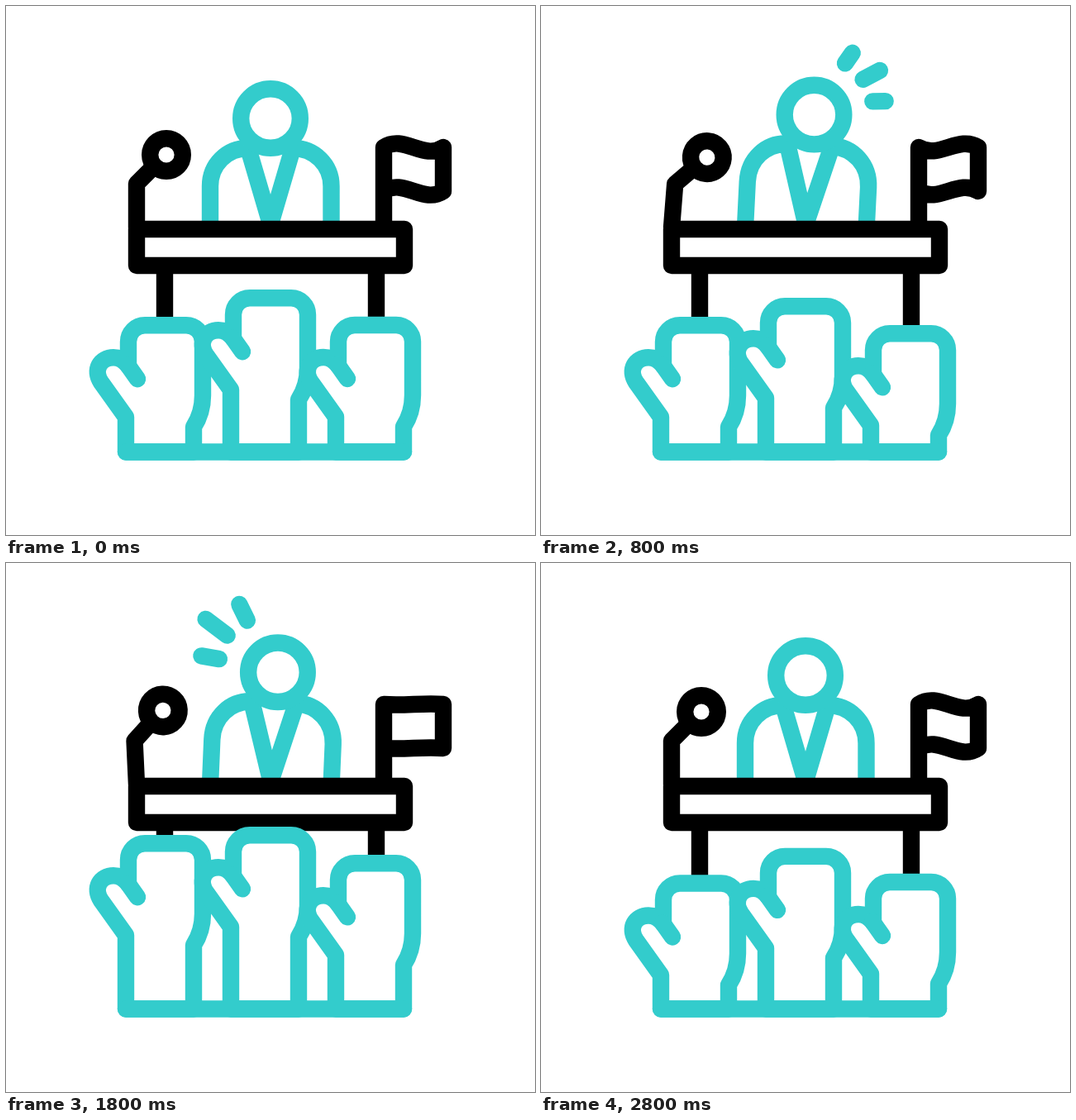
Animation of 640x640 px, one loop 2.84 s. Source, as an HTML page with a canvas:

```html
<!DOCTYPE html>
<html lang="en">
<head>
<meta charset="utf-8">
<title>Speaker and audience</title>
<style>
  html, body { margin: 0; width: 100%; height: 100%; overflow: hidden; background: #fff; }
  canvas { display: block; width: 640px; height: 640px; }
</style>
</head>
<body>
<canvas id="stage" width="640" height="640"></canvas>
<script>
const ctx = document.getElementById('stage').getContext('2d');
const TEAL = '#33cccc', BLACK = '#000';
const STEP = 40, STEPS = 71;
const RAD = Math.PI / 180;

// The speaker leans left (-1) and right (1) twice per loop
const LEAN = [[0, 0], [6, -1], [13, -1], [18, 1], [24, 1], [30, 0],
              [35, 0], [40, -1], [46, 1], [60, 1], [67, 0]];

// Each hand swings between its two levels; turns are the steps where it reverses, highest first
const HANDS = [
  { x: 0, levels: [327, 383], turns: [-7, 2, 9, 18, 27, 37, 44, 53, 62, 72] },
  { x: 127, levels: [319, 387], turns: [-15, -6, 4, 13, 27, 35, 45, 56, 65, 77] },
  { x: 254, levels: [320, 386], turns: [-6, 2, 13, 20, 30, 40, 50, 57, 64, 72] }
];
for (const hand of HANDS) hand.path = hand.turns.map((t, i) => [t, hand.levels[i % 2]]);

// Rays burst on alternating sides, twice per loop
const LEFT = { side: -1, radius: 67, turn: 26 };
const RIGHT = { side: 1, radius: 72, turn: 35 };
const BURSTS = [[7, LEFT], [19, RIGHT], [42, LEFT], [54, RIGHT]];
const BURST_STEPS = 7;

const mix = (a, b, u) => a + (b - a) * u;
const ease = u => u * u * (3 - 2 * u);

// Eased value at step k on a path of [step, value] points
function along(path, k) {
  const next = path.findIndex(([t]) => t > k);
  if (next === 0) return path[0][1];
  if (next < 0) return path[path.length - 1][1];
  const [t0, a] = path[next - 1], [t1, b] = path[next];
  return mix(a, b, ease((k - t0) / (t1 - t0)));
}

function stroke(path, color, fill) {
  const shape = new Path2D(path);
  if (fill) {
    ctx.fillStyle = fill;
    ctx.fill(shape);
  }
  ctx.strokeStyle = color;
  ctx.stroke(shape);
}

function ring(x, y, r, color) {
  ctx.beginPath();
  ctx.arc(x, y, r, 0, Math.PI * 2);
  ctx.fillStyle = '#fff';
  ctx.fill();
  ctx.strokeStyle = color;
  ctx.stroke();
}

// Draws with the origin at x, y, turned and stretched in height
function posed(x, y, degrees, stretch, draw) {
  ctx.save();
  ctx.translate(x, y);
  ctx.rotate(degrees * RAD);
  ctx.scale(1, stretch);
  draw();
  ctx.restore();
}

function drawRays(k, x, y) {
  for (const [start, { side, radius, turn }] of BURSTS) {
    const age = k - start;
    if (age <= 0 || age >= BURST_STEPS) continue;
    const inner = (age / BURST_STEPS) ** 2, outer = Math.min(1, Math.sqrt(age / 4));
    for (let i = 0; i < 3; i++) {
      const place = (31 + 23 * i) * RAD, heading = (turn + 27 * i) * RAD;
      const length = i === 1 ? 48 : 32;
      const at = u => {
        const px = radius * Math.sin(place) + length * u * Math.sin(heading);
        const py = radius * Math.cos(place) + length * u * Math.cos(heading);
        return `${x + side * px} ${y - py}`;
      };
      stroke(`M${at(inner)}L${at(outer)}`, TEAL);
    }
  }
}

function drawSpeaker(k) {
  const dx = 10.5 * along(LEAN, k), dy = -0.42 * dx;
  posed(320, 270, 0.27 * dx, 1 - dy / 110, () => {
    stroke('M-73 5V-52C-73 -78 -53 -98 -27 -98L0 -6L27 -98C53 -98 73.5 -78 73.5 -52V5', TEAL);
  });
  ring(320 + dx, 136 + dy, 35.8, TEAL);
  drawRays(k, 320 + dx, 136 + dy);
}

// The microphone follows the speaker a little later
function drawMicrophone(k) {
  const lean = along(LEAN, k - 2.5);
  posed(158, 268, lean * (lean < 0 ? 10.8 : 4.8), 1, () => {
    stroke('M0 0V-53L24 -77', BLACK);
    ring(36, -88, 19.8, BLACK);
  });
}

function drawFlag(k) {
  const h = 16 * Math.cos(2 * Math.PI * (k - 0.5) / 35);
  stroke(`M457 270V171C481 ${171 - h} 505 ${171 + h} 529 171V224` +
    `C505 ${224 + h} 481 ${224 - h} 457 224`, BLACK);
}

function drawDesk() {
  stroke('M192 314V400M448 314V400', BLACK);
  stroke('M158 270H482V314H158Z', BLACK, '#fff');
}

function drawHand({ x, path }, k) {
  const top = along(path, k) + 10.3, floor = 539.5 - top;
  ctx.save();
  ctx.translate(x, top);
  stroke(`M145 ${floor}V111L115 69C105 54 114 39 130 39C138 39 143 43 147 48` +
    `L148 49V20A20 20 0 0 1 168 0H218A20 20 0 0 1 238 20V85Q238 106 227 123V${floor}Z`,
    TEAL, '#fff');
  stroke('M147 48L159 65', TEAL);
  ctx.restore();
}

function draw(k) {
  ctx.fillStyle = '#fff';
  ctx.fillRect(0, 0, 640, 640);
  ctx.lineWidth = 20.4;
  ctx.lineCap = ctx.lineJoin = 'round';
  drawSpeaker(k);
  drawMicrophone(k);
  drawFlag(k);
  drawDesk();
  HANDS.forEach(hand => drawHand(hand, k));
  stroke('M145 539.5H481', TEAL);
}

const begin = performance.now();
function tick() {
  draw(Math.floor((performance.now() - begin) / STEP) % STEPS);
  requestAnimationFrame(tick);
}
tick();
</script>
</body>
</html>
```
